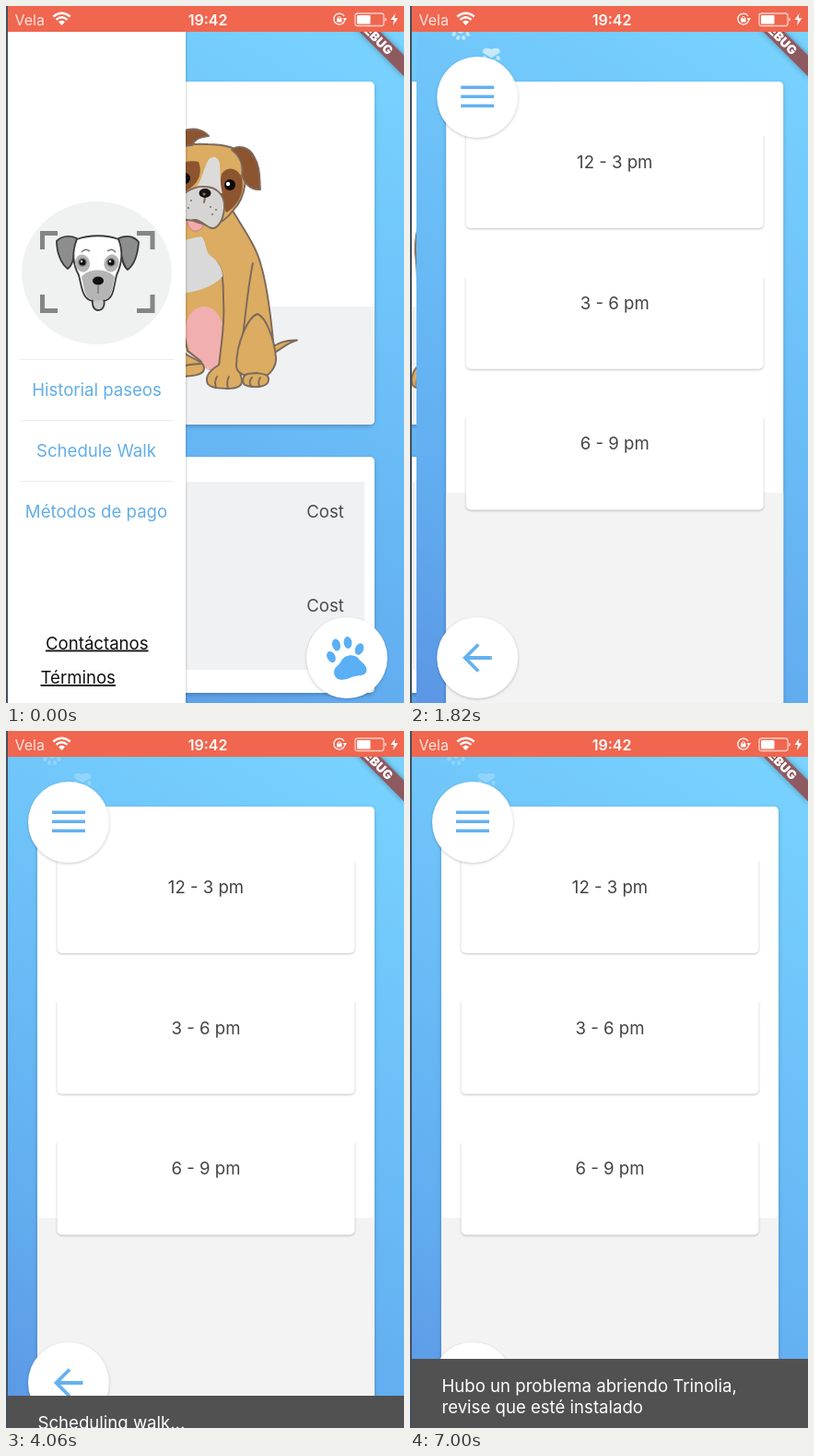
Animation, 432 px wide and 756 px high, one loop 7070 ms. Source, as an HTML page:

```html
<!DOCTYPE html>
<html lang="es">
<head>
<meta charset="utf-8">
<title>Paseos</title>
<style>
  html, body { margin: 0; width: 100%; height: 100%; overflow: hidden; background: #fff; }
  svg { display: block; width: 100vw; height: 100vh; font: 18.6px Inter, Roboto, sans-serif; }
  .mid { text-anchor: middle; }
  .link { fill: #62aee6; text-anchor: middle; }
  .card { fill: #fff; filter: drop-shadow(0 2px 2px rgba(0, 0, 0, .22)); }
  .slot { fill: #fff; filter: drop-shadow(0 1px 1px rgba(0, 0, 0, .24)); }
  .fab { fill: #fff; filter: drop-shadow(0 1px 1.5px rgba(0, 0, 0, .22)); }
  .ink { stroke: #7b695c; stroke-width: 1.9; stroke-linejoin: round; stroke-linecap: round; }
  .tan { fill: #dbac61; }
  .brown { fill: #8d5430; }
  .pale { fill: #d6d5d4; }
  .line { fill: none; }
  .tail { transform-origin: 287px 376px; }
  .belly { transform-origin: 238px 360px; }
</style>
</head>
<body>
<script>
const LOOP = 7070;

const text = (x, y, s, attrs = '') => `<text x="${x}" y="${y}" ${attrs}>${s}</text>`;
const shape = (cls, d) => `<path class="${cls}" d="${d}"/>`;
const dot = (x, y, r, fill) => `<circle cx="${x}" cy="${y}" r="${r}" fill="${fill}"/>`;
const oval = (x, y, rx, ry, turn = 0) =>
  `<ellipse rx="${rx}" ry="${ry}" transform="translate(${x} ${y}) rotate(${turn})"/>`;
const fab = (x, y, icon) => `<circle class="fab" cx="${x}" cy="${y}" r="44"/>${icon}`;

const pawPrint = (x, y, name) => `
  <g transform="translate(${x} ${y})"><g class="${name}" fill="#fff" opacity="0">
    <path d="M0-7C4-9 9-9 9.500-5C9.500-2 4-1 2 1Q0 3-2 1C-4-1-9.500-2-9.500-5C-9-9-4-9 0-7Z"/>
    ${oval(-7.5, 2.5, 2, 2.5, 30)}${oval(-3, 6.5, 2, 2.5, 10)}
    ${oval(3, 6.5, 2, 2.5, -10)}${oval(7.5, 2.5, 2, 2.5, -30)}
  </g></g>`;

const background = `
  <rect x="2" width="430" height="756" fill="url(#sky)"/>
  ${pawPrint(50, 28, 'print-top')}${pawPrint(83, 54, 'print-top')}
  ${pawPrint(88, 472, 'print-gap')}
  ${pawPrint(345, 34, 'print-right')}${pawPrint(377, 76, 'print-right')}`;

const menuButton = fab(68, 99,
  '<path d="M50 88.3H86M50 98.3H86M50 108.3H86" stroke="#64b1f1" stroke-width="3.6"/>');

const backButton = fab(68, 707,
  '<path d="M83.5 707H54M69 692.5L54.5 707L69 721.5" fill="none" stroke="#64b1f1" stroke-width="3.8"/>');

const pawButton = fab(370, 707, `
  <g fill="#5aaff5">
    ${oval(353, 706, 4.4, 6.4, -28)}${oval(358.5, 693, 4.4, 6.6, -14)}
    ${oval(371, 690.5, 4.4, 6.6, -4)}${oval(383.5, 697.5, 4.4, 6.6, 22)}
    <path d="M356 722C357 716 362 715 364 710C367 704 377 702 382 707C385 712 392 714 391.500 721
      C390 728 382 725 375 728C367 732 356 733 356 722Z"/>
  </g>`);

const dog = `
  ${shape('ink tan tail', 'M287 371C295 366 303 362 316 362.5C306 365 300 371 290 377Z')}
  ${shape('ink tan', `M170 203C155 222 147 245 148 268C152 300 151 345 157 388L178 390C173 360 176 335 174 304
    L187 309C193 325 191 350 197 374L224 396L262 400L292 384C289 350 284 305 277 282C272 261 258 242 246 222Z`)}
  <path class="belly" d="M216 326C228 326 238 342 237 362C236 382 230 395 224 395C211 395 195 376 195 352
    C195 336 204 326 216 326Z" fill="#f2afb0"/>
  ${shape('ink tan', `M175 338C187 339 191 346 193 358C195 370 191 374 196 378C205 384 216 386 215 394
    C213 403 194 401 181 403L178 390Z`)}
  ${shape('ink line', 'M197 374C202 378 207 381 212 386M195 390C201 388 206 389 211 388')}
  ${shape('ink tan', `M157 386C146 392 142 403 145 411C149 417 160 414 166 413C175 413 183 411 183 404
    C184 397 179 390 178 387`)}
  ${shape('ink line', 'M151 403C149 407 149 411 150 414M161 403C158 407 158 411 159 414M171 403C169 407 169 410 170 413')}
  <path d="M231 285L236 330L231 391L252 395L262 330L266 285Z" fill="#dbac61"/>
  ${shape('ink line', 'M222 274C234 278 236 290 236 320C238 345 233 370 231 391M268 279C261 310 259 355 252 392')}
  ${shape('ink tan', `M230 390C220 396 216 403 219 410C224 416 234 414 240 415C248 415 256 414 256 407
    C256 400 252 395 252 390`)}
  ${shape('ink line', 'M229 402C226 407 227 411 228 414M242 402C239 407 240 411 241 415')}
  ${shape('ink tan', `M273 334C263 337 250 365 250 391C251 402 268 402 278 402C287 402 294 389 293 381
    C291 362 283 338 273 334Z`)}
  ${shape('ink tan', 'M262 399C256 401 255 411 262 412C270 414 284 414 285 406C286 399 278 399 272 398Z')}
  ${shape('ink line', 'M267 403C264 406 264 410 266 412M276 403C274 406 274 410 275 413')}
  <path d="M167 257C178 262 195 252 212 250C218 256 216 265 221 270C230 276 235 285 235 293
    C228 303 205 312 190 311C174 304 165 280 167 257Z" fill="#d9d9d9"/>
  <path class="tongue" d="M196 230C196 242 200 249 207 248C214 247 216 239 215 231Z" fill="#f6a9ac" stroke="#b98280"/>
  ${shape('ink tan', `M176 160C186 150 203 149 219 150C238 150 251 154 257 162C263 180 261 207 247 221
    C240 231 230 237 222 239C205 234 184 228 173 211C165 194 167 173 176 160Z`)}
  ${shape('ink brown', 'M174 163C173 146 183 137 198 134C207 132 216 136 220 141C211 142 205 144 202 151C192 151 181 155 174 163Z')}
  ${shape('ink brown', 'M245 156C252 150 264 153 269 163C276 174 275 186 276 199C267 200 260 194 256 184C258 172 253 162 245 156Z')}
  ${shape('brown', 'M181 177C189 169 201 167 209 169C214 182 208 193 198 199C190 204 187 211 181 209C176 199 177 187 181 177Z')}
  ${shape('brown', 'M234 182C241 173 250 176 255 184C261 200 251 218 239 224C235 215 230 196 234 182Z')}
  <path d="M218 170C222 161 231 162 232 172C233 184 232 193 235 203L203 200C212 193 213 181 218 170Z" fill="#dcdbd9"/>
  ${shape('ink pale', `M183 218C187 205 202 195 216 196C230 196 238 207 237 219C236 232 230 242 223 241
    C216 239 212 232 205 232C195 234 182 228 183 218Z`)}
  ${shape('ink line', 'M216 207L215 213')}
  <ellipse cx="216" cy="203" rx="6.5" ry="5" fill="#17120f"/>
  ${dot(215, 204, 1.6, '#777')}
  ${dot(194, 187, 6, '#0d0a08')}${dot(243, 194, 6, '#0d0a08')}
  ${dot(193, 188, 2.2, '#fff')}${dot(241, 193, 2.2, '#fff')}
  ${[[194, 213], [201, 211], [198, 219], [222, 218], [228, 221], [224, 226]]
    .map(([x, y]) => dot(x, y, 1.1, '#777')).join('')}`;

const walkRow = y => text(67, y, 'Walker', 'font-size="16.7" fill="#4c4c4c"')
  + text(67, y + 27, 'Date', 'font-size="15.7" fill="#9c9c9c"')
  + text(346.5, y + 11, 'Cost', 'class="mid" fill="#4c4c4c"');

const home = `${background}
  <rect class="card" x="34" y="82" width="366" height="372" rx="5"/>
  <path d="M34 326H400V449Q400 454 395 454H39Q34 454 34 449Z" fill="#f0f1f3"/>
  ${dog}
  <rect class="card" x="34" y="489" width="366" height="256" rx="5"/>
  <rect x="45" y="516" width="344" height="204" fill="#f0f1f3"/>
  ${walkRow(544)}${walkRow(646)}
  ${menuButton}${pawButton}`;

const slot = (label, i) => `
  <rect class="slot" x="55.5" y="${137 + i * 152.7}" width="323" height="104" rx="5"/>
  <rect x="52" y="${133 + i * 152.7}" width="330" height="8" fill="#fff"/>
  ${text(217, 176 + i * 152.5, label, 'class="mid" fill="#444"')}`;

const schedule = `${background}
  <rect class="card" x="34" y="82" width="366" height="690" rx="5"/>
  <rect x="34" y="528" width="366" height="228" fill="#f3f3f3"/>
  ${['12 - 3 pm', '3 - 6 pm', '6 - 9 pm'].map(slot).join('')}
  ${menuButton}${backButton}`;

const portrait = `
  <ellipse cx="98.5" cy="289.5" rx="81.5" ry="77.5" fill="#f0f2f2"/>
  <path d="M39.5 264V246.5H56M142 246.5H159V264M159 313V330.5H142M56 330.5H39.5V313"
    fill="none" stroke="#858585" stroke-width="5"/>
  <g stroke="#3a3a3a" stroke-width="1.8" stroke-linejoin="round">
    <path d="M77 252C68 248 60 250 55 255C55 268 60 280 67 285C73 281 74 270 75 262Z" fill="#8d8d8d"/>
    <path d="M122 252C131 248 139 250 144 256C143 269 139 281 132 286C126 281 125 270 124 262Z" fill="#8d8d8d"/>
    <path d="M77 253C90 248 110 248 122 253C127 265 126 279 120 292C117 304 117 316 109 319
      C104 322 96 322 91 319C83 316 82 304 79 292C72 279 72 265 77 253Z" fill="#fff"/>
    <path d="M94 318C93 326 96 330 100 330C105 330 108 325 106 318Z" fill="#c9c9c9"/>
  </g>
  <g fill="#b5b5b5">
    ${oval(83, 279, 8, 9.5, -15)}${oval(114.5, 279, 8, 9.5, 15)}
    <path d="M82 294C88 284 111 284 118 294C115 308 115 316 108 318C103 320 97 320 92 318C84 315 85 304 82 294Z"/>
  </g>
  <ellipse cx="100" cy="298" rx="6" ry="4.5" fill="#111"/>
  <path d="M100 302V312M82 267Q86 262 91 266M110 266Q115 262 119 267" fill="none" stroke="#777" stroke-width="1.5"/>
  ${dot(83, 278, 5, '#888')}${dot(83, 278, 3.5, '#111')}${dot(114, 278, 5, '#888')}${dot(114, 278, 3.5, '#111')}
  ${dot(82, 277, 1.2, '#fff')}${dot(113, 277, 1.2, '#fff')}`;

const drawer = `
  <rect x="-40" y="0" width="235" height="756" fill="#fff" style="filter:drop-shadow(1px 0 1px rgba(0,0,0,.16))"/>
  ${portrait}
  <path d="M15 383.5H182M15 449.5H182M15 515.5H182" stroke="#ececec"/>
  ${text(98.5, 423, 'Historial paseos', 'class="link"')}
  ${text(98, 489, 'Schedule Walk', 'class="link"')}
  ${text(98, 555, 'Métodos de pago', 'class="link"')}
  <g fill="#111" text-decoration="underline">
    ${text(43, 697.5, 'Contáctanos')}${text(37.5, 735, 'Términos')}
  </g>`;

const snack = (name, top, lines) => `
  <g class="${name}"><rect y="${top}" width="432" height="${757 - top}" fill="#515151"/>
    ${lines.map((s, i) => text(34.5, top + 36 + i * 23, s, 'fill="#fff"')).join('')}</g>`;

const chrome = `
  <g transform="translate(432 0) rotate(45)">
    <rect x="-54" y="37.8" width="108" height="16.2" fill="#8f5960"
      style="filter:drop-shadow(0 0 3px rgba(0,0,0,.3))"/>
    ${text(2, 50.7, 'DEBUG', 'class="mid" font-size="13.6" font-weight="900" fill="#fff"')}
  </g>
  <rect width="432" height="28" fill="#f0664f"/>
  <g fill="#fff">
    ${text(9.5, 20.5, 'Vela', 'font-size="16" fill="#fde3dd"')}
    ${text(219, 20.5, '19:42', 'class="mid" font-size="16" font-weight="600"')}
    <path d="M60.5 21L57 17.3Q60.5 14.4 64 17.3Z"/>
    <path d="M54.5 14.8Q60.5 9.8 66.500 14.8M51.3 11.5Q60.5 4.2 69.7 11.5" fill="none" stroke="#fff" stroke-width="2.4"/>
    <path d="M367 11A6 6 0 1 0 367.5 16" fill="none" stroke="#fff" stroke-width="1.2"/>
    <path d="M365.5 13H370L367.8 16.5Z"/>
    <rect x="359" y="13.5" width="5.5" height="4"/>
    <path d="M360.3 14V12.5Q361.8 10 363.3 12.5V14" fill="none" stroke="#fff"/>
    <rect x="379" y="8" width="31" height="13.5" rx="2.5" fill="none" stroke="#fbd0c8" stroke-width="1.3"/>
    <rect x="381" y="10" width="14.5" height="9.5" rx="1"/>
    <path d="M411.5 12.5Q414 14.7 411.5 17Z"/>
    <path d="M422.5 8L417.5 15H421L420 21L425.5 13.3H421.8Z"/>
  </g>
  <rect width="2" height="756" fill="#41505f"/>`;

document.body.innerHTML = `
<svg viewBox="0 0 432 756" preserveAspectRatio="none">
  <defs><linearGradient id="sky" gradientUnits="userSpaceOnUse" x1="432" y1="0" x2="0" y2="756">
    <stop offset="0" stop-color="#7ad5ff"/><stop offset=".5" stop-color="#69bbf6"/>
    <stop offset=".75" stop-color="#62adf0"/><stop offset="1" stop-color="#5b96e4"/>
  </linearGradient></defs>
  <g class="home">${home}</g>
  <g class="drawer">${drawer}</g>
  <g class="schedule">${schedule}</g>
  ${snack('snack-wait', 704, ['Scheduling walk...'])}
  ${snack('snack-fail', 681, ['Hubo un problema abriendo Trinolia,', 'revise que esté instalado'])}
  ${chrome}
</svg>`;

const SHARP = 'cubic-bezier(.4,0,.2,1)';
const PUSH = 'cubic-bezier(.35,.91,.33,.97)';
const moveX = x => ({ transform: `translateX(${x}px)` });
const moveY = y => ({ transform: `translateY(${y}px)` });
const turn = a => ({ transform: `rotate(${a}deg)` });
const squeeze = s => ({ transform: `scaleX(${s})` });
const fade = opacity => ({ opacity });

// Each step: [ms, pose, easing towards the next step]
function loop(name, steps) {
  const all = [...steps, [LOOP, steps.at(-1)[1]]];
  const frames = all.map(([ms, pose, easing = 'linear']) => ({ ...pose, offset: ms / LOOP, easing }));
  document.querySelectorAll('.' + name)
    .forEach(el => el.animate(frames, { duration: LOOP, iterations: Infinity }));
}

loop('drawer', [[0, moveX(0)], [140, moveX(0), SHARP], [460, moveX(-205)]]);
loop('home', [[0, moveX(0)], [1500, moveX(0), PUSH], [1900, moveX(-144)]]);
loop('schedule', [[0, moveX(432)], [1500, moveX(432), PUSH], [1900, moveX(0)]]);
loop('snack-wait', [[0, moveY(54)], [2480, moveY(54), SHARP], [2730, moveY(0)],
  [3990, moveY(0), SHARP], [4240, moveY(54)]]);
loop('snack-fail', [[0, moveY(77)], [4240, moveY(77), SHARP], [4490, moveY(0)]]);
loop('tail', [[0, turn(0)], [630, turn(-12)], [1330, turn(-24)], [2000, turn(-12)]]);
loop('tongue', [[0, moveY(-4)], [630, moveY(0)], [1330, moveY(-4)]]);
loop('belly', [[0, squeeze(1)], [630, squeeze(1)], [1330, squeeze(.93)]]);
loop('print-top', [[0, fade(.1)], [630, fade(.2)], [1330, fade(.32)], [1820, fade(.6)], [2500, fade(.22)]]);
loop('print-gap', [[0, fade(0)], [630, fade(.15)], [1250, fade(.95)], [1400, fade(.95)], [1900, fade(.1)]]);
loop('print-right', [[0, fade(0)], [4300, fade(0)], [4830, fade(.16)], [5500, fade(0)]]);
</script>
</body>
</html>
```
